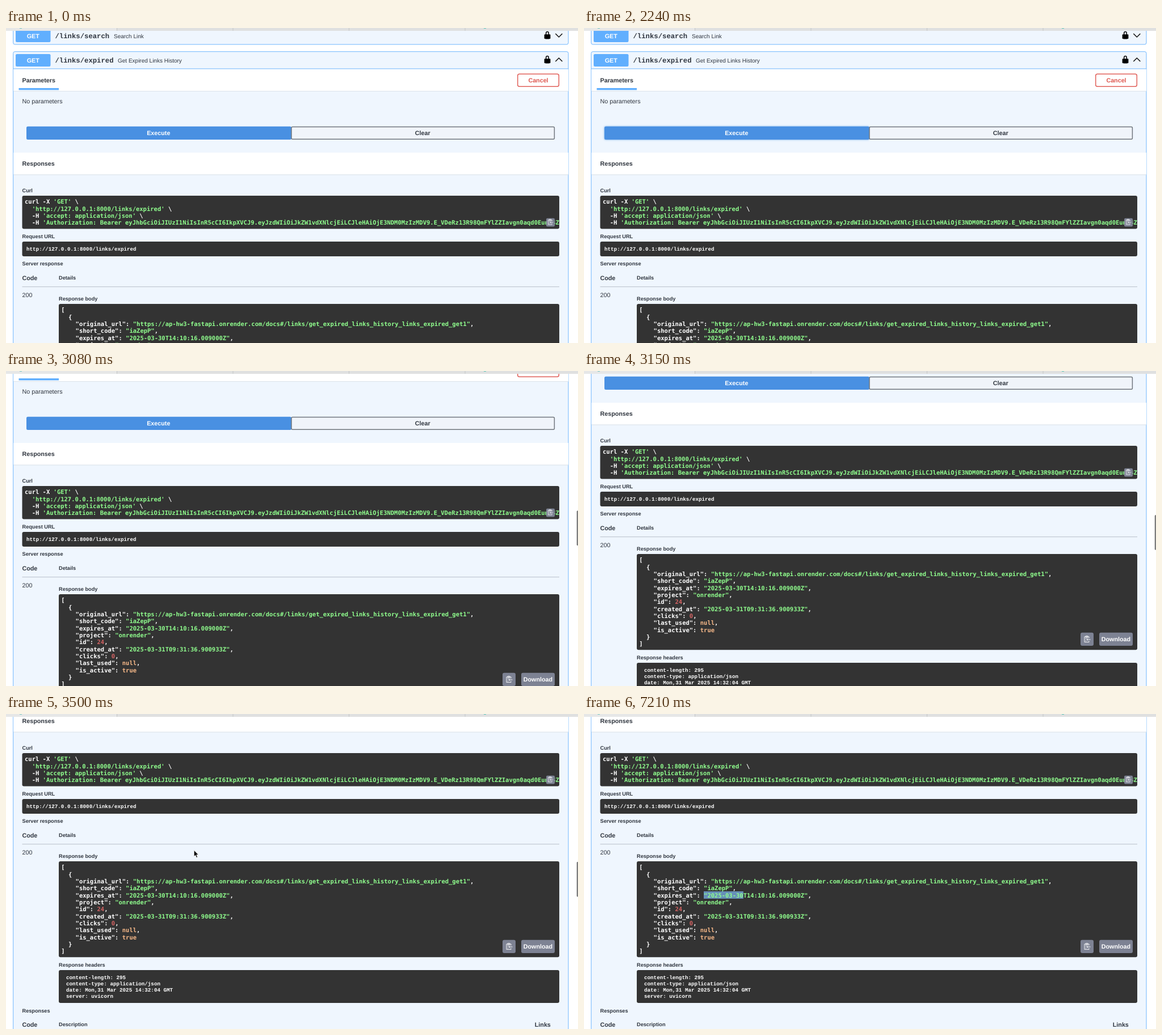
An HTML page that plays this animation: 1008x556 px, repeating every 7630 ms.

```html
<!DOCTYPE html>
<html lang="en">
<head>
<meta charset="utf-8">
<title>API docs</title>
<style>
  html, body { margin: 0; height: 100%; overflow: hidden; background: #fff; }
  svg { display: block; width: 100vw; height: 100vh; }
  text { font-family: "Liberation Sans", Arial, sans-serif; fill: #30363f; white-space: pre; text-rendering: geometricPrecision; }
  .b { font-weight: 700; }
  .code { font: 700 10.51px "DejaVu Sans Mono", monospace; fill: #fff; }
  .mono { font: 700 9.22px "Liberation Mono", monospace; fill: #fff; }
  .path { font: 700 12.27px "Liberation Mono", monospace; }
  .str { fill: #90ff8e; }
  .num { fill: #d36363; }
  .lit { fill: #f6b888; }
</style>
</head>
<body>
<svg viewBox="0 0 1008 556">
  <defs>
    <clipPath id="curlClip"><rect x="28.5" y="296" width="946.5" height="58.5"/></clipPath>
    <filter id="soft" x="-5%" y="-50%" width="110%" height="200%"><feGaussianBlur stdDeviation="1.8"/></filter>
  </defs>
  <g id="page"></g>
  <g id="tabs"></g>
  <rect id="bar" x="1005.7" width="4" height="61.5" rx="1.5" fill="#7d7d7d"/>
  <path id="cursor" d="M331.3 240.6v11l2.5-2.3 1.8 4.1 1.9-.8-1.8-4h3.4z" stroke="#fff" stroke-width=".7"/>
</svg>
<script>
const $ = id => document.getElementById(id);
const BIG = 10.74, SMALL = 9.2;
const BLUE = '#61affe', TINT = '#eff6fe', DARK = '#333', GREY = '#7d8293';

const rect = (x, y, x2, y2, fill, extra = '') =>
  `<rect x="${x}" y="${y}" width="${x2 - x}" height="${y2 - y}" fill="${fill}" ${extra}/>`;
const text = (x, y, s, size = BIG, extra = 'class="b"') =>
  `<text x="${x}" y="${y}" font-size="${size}" ${extra}>${s}</text>`;
const centered = (x, y, s, color) =>
  text(x, y, s, BIG, `class="b" text-anchor="middle" style="fill:${color}"`);
const lines = (x, y, step, cls, rows) =>
  rows.map((s, i) => `<text x="${x}" y="${y + i * step}" class="${cls}">${s}</text>`).join('');
const span = (cls, s) => `<tspan class="${cls}">${s}</tspan>`;
const panel = (x, y, y2) => rect(x, y, 975, y2, DARK, 'rx="3"');

const lock = y => `<path transform="translate(946.3 ${y})" fill-rule="evenodd"
  d="M3.4 6.2H4.6V4.3C4.6 2 5.7.7 7.7.7s3 1.3 3 3.6v1.9h1.4q1 0 1 1V13q0 .8-.8 1-2 .6-4.6.6T3.1 14q-.8-.2-.8-1V7.2q0-1 1.1-1zM6.1 6.2h3.1V4q0-1.7-1.5-1.7T6.1 4z"/>`;
const chevron = (y, dy) =>
  `<path d="M968.3 ${y}l6 ${dy} 6 ${-dy}" fill="none" stroke="#111" stroke-width="1.5"/>`;
const clipboard = (x, y, s) => `<g transform="translate(${x} ${y}) scale(${s})" fill="none" stroke="#fff" stroke-width=".9">
  <path d="M9 4V1.5H1v9.5h8V9M3.2 2.8V.3h3.6v2.5zM11.5 6.5H5M7.3 4.2L5 6.5l2.3 2.3M2.7 5h2M2.7 8.6h1.6"/></g>`;

const row = (y, path, label, labelX) =>
  rect(17, y - 11, 78.5, y + 11, BLUE, 'rx="2.3"') + centered(47.7, y + 4, 'GET', '#fff') +
  text(86.5, y + 3.7, path, 12.27, 'class="path"') + text(labelX, y + 3.5, label, 10, '') +
  lock(y - 9);
const header = (y, y2) =>
  rect(13, y, 991, y2, '#fff') + rect(13, y2, 991, y2 + 1, '#dbe3ea');
const block = (y, y2) =>
  rect(12.7, y, 991, y2, TINT, `rx="3" stroke="${BLUE}" stroke-width=".9"`);

const token = 'eyJhbGciOiJIUzI1NiIsInR5cCI6IkpXVCJ9.eyJzdWIiOiJkZW1vdXNlcjEiLCJleHAiOjE3NDM0MzIzMDV9' +
  '.E_VDeRz13R98QmFYlZZIavgn0aqd0Eunx4ZpK';
const curl = [
  `curl -X ${span('str', "'GET'")} \\`,
  `  ${span('str', "'http://127.0.0.1:8000/links/expired'")} \\`,
  `  -H ${span('str', "'accept: application/json'")} \\`,
  `  -H ${span('str', "'Authorization: Bearer " + token)}`
];

const link = {
  original_url: 'https://ap-hw3-fastapi.onrender.com/docs#/links/get_expired_links_history_links_expired_get1',
  short_code: 'iaZepP',
  expires_at: '2025-03-30T14:10:16.009000Z',
  project: 'onrender',
  id: 24,
  created_at: '2025-03-31T09:31:36.900933Z',
  clicks: 0,
  last_used: null,
  is_active: true
};
const kind = v => typeof v === 'string' ? 'str' : typeof v === 'number' ? 'num' : 'lit';
const fields = Object.entries(link).map(([k, v], i, all) =>
  `    "${k}": ${span(kind(v), JSON.stringify(v))}${i < all.length - 1 ? ',' : ''}`);

$('page').innerHTML =
  block(-1.5, 29) + row(14, '/links/search', 'Search Link', 190) + chevron(10, 6) +
  block(41.7, 900) + rect(13, 71.5, 991, 72.5, BLUE) +
  row(57, '/links/expired', 'Get Expired Links History', 197) + chevron(59, -6) +

  header(72.7, 111) + text(28.5, 96, 'Parameters') + rect(22.5, 106, 93, 109.5, BLUE) +
  rect(901.7, 81.2, 974.3, 103.3, 'none', 'rx="3" stroke="#e0605a" stroke-width="1.5"') +
  centered(938, 96, 'Cancel', '#de5850') +
  text(28.5, 133, 'No parameters', BIG, '') +
  rect(35.5, 173.5, 503, 197.5, '#5b9fe6', 'id="glow" rx="3" filter="url(#soft)"') +
  rect(36, 173.7, 503, 197, '#4990e2', 'rx="2.5"') +
  rect(503, 174.6, 966.4, 196.2, '#f0f4fa', 'rx="2" stroke="#70767d" stroke-width="1.5"') +
  centered(268.8, 189, 'Execute', '#fff') + centered(734.3, 189, 'Clear', '#30363f') +

  header(220, 258.5) + text(28.5, 243, 'Responses') +
  text(28.5, 290, 'Curl', SMALL) + panel(28.5, 296, 354.5) +
  `<g clip-path="url(#curlClip)">${lines(33, 310.4, 12.33, 'code', curl)}</g>` +
  rect(952, 335.7, 967, 350.5, GREY, 'rx="2"') + clipboard(954.5, 337.6, .85) +
  text(28.5, 370.8, 'Request URL', SMALL) + panel(28.5, 377, 403) +
  lines(36, 393.4, 0, 'mono', ['http://127.0.0.1:8000/links/expired']) +
  text(28.5, 419.3, 'Server response', SMALL) +
  text(28.5, 444.8, 'Code') + text(93, 444, 'Details', SMALL) +
  rect(28.5, 456.3, 975, 457.2, '#b3bac3') + text(28.5, 475, '200', BIG, '') +

  text(93, 481, 'Response body', SMALL) + panel(93, 487, 656.3) +
  rect(211, 540, 211, 553, '#6690b8', 'id="selection"') +
  lines(97.3, 501.2, 12.33, 'code', ['[', '  {', ...fields, '  }', ']']) +
  rect(875, 625.7, 898, 649, GREY, 'rx="3"') + clipboard(881, 631.5, 1) +
  rect(908, 625.7, 967, 649, GREY, 'rx="3"') + centered(937.4, 641, 'Download', '#fff') +

  text(93, 672.8, 'Response headers', SMALL) + panel(93, 679, 737) +
  lines(106, 695, 10.9, 'mono', ['content-length: 295', 'content-type: application/json',
    'date: Mon,31 Mar 2025 14:32:04 GMT', 'server: uvicorn']) +
  text(28.5, 753.8, 'Responses', SMALL) +
  text(28.5, 778.9, 'Code') + text(93, 778.2, 'Description', SMALL) + text(931.8, 778.9, 'Links');

$('tabs').innerHTML =
  rect(0, 0, 1008, 5, '#dfe0e0') + rect(0, 0, 195, 5, '#e6e7e7') +
  [195, 399.5, 604, 808.5].map(x => rect(x, 0, x + 1, 5, '#c6c7c8')).join('') +
  rect(24, 0, 28, 1, '#7cc9c3') + rect(842, 0, 846, 1, '#5fc9b8');

const LOOP = 7630, STEP = 70;
const scroll = [1, 3, 8, 17, 93, 164, 195, 211, 219, 224, 227];
const clamp = (v, lo, hi) => Math.min(hi, Math.max(lo, v));
const stepAt = (t, start) => Math.floor((t - start) / STEP);
const progress = (t, start, steps) => clamp((stepAt(t, start) + 1) / steps, 0, 1);

function draw(now) {
  const t = now % LOOP;
  const i = stepAt(t, 2800);
  const y = i < 0 ? 0 : scroll[Math.min(i, scroll.length - 1)];
  $('page').setAttribute('transform', `translate(0 ${-y})`);
  $('glow').setAttribute('opacity', t < 2800 ? progress(t, 1260, 5) * .7 : 0);
  $('bar').setAttribute('y', 236.3 + y * .109);
  $('bar').setAttribute('opacity', i < 0 ? 0 : 1 - progress(t, 7000, 4));
  $('cursor').setAttribute('visibility', t >= 3290 && t < 3710 ? 'visible' : 'hidden');
  $('selection').setAttribute('width', Math.round(progress(t, 4970, 5) * 11) * 6.35);
}

const start = performance.now();
function tick() {
  draw(performance.now() - start);
  requestAnimationFrame(tick);
}
tick();
</script>
</body>
</html>
```
